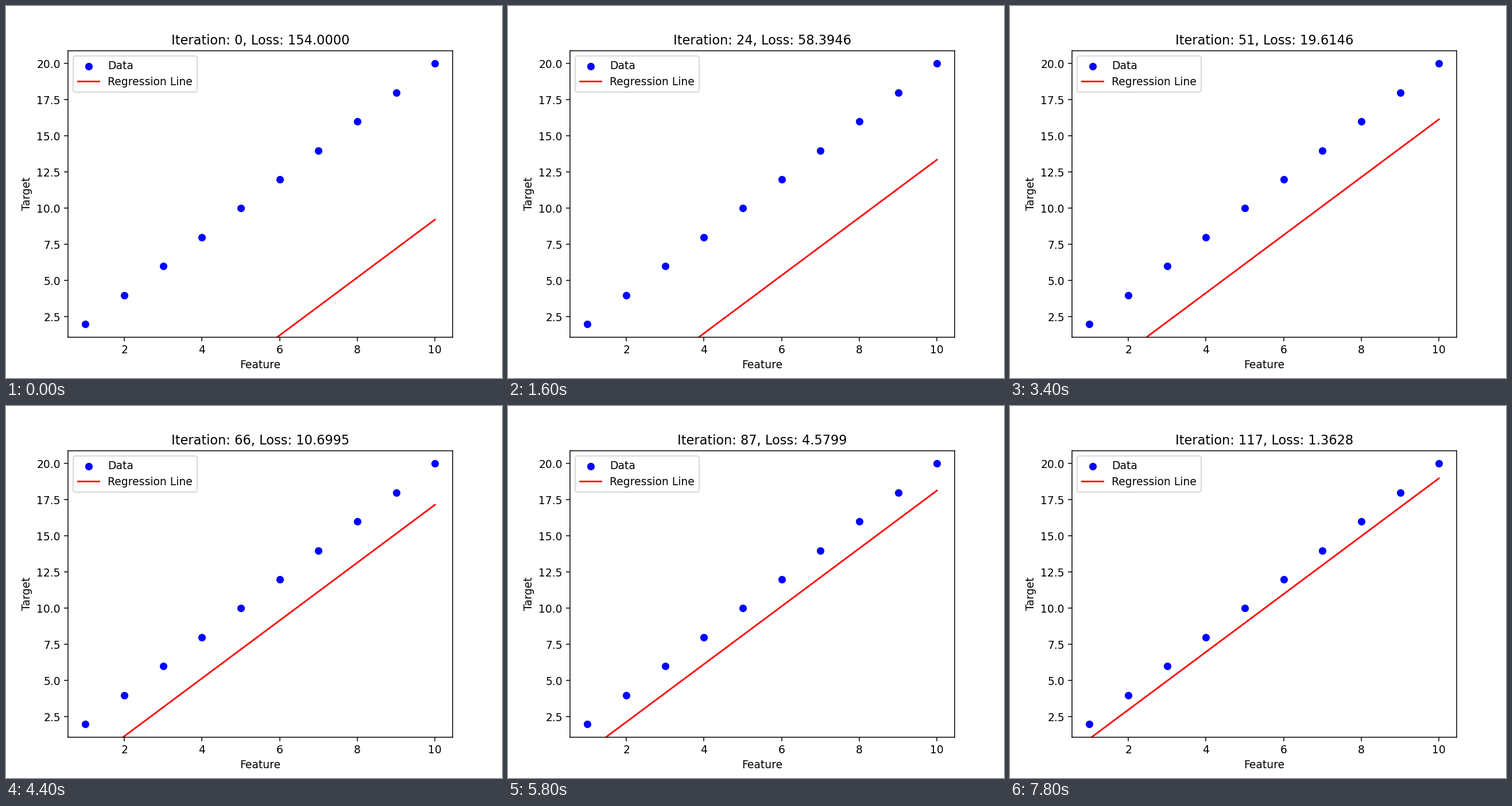
A matplotlib script for the animation above (8000 ms loop, 864 by 648 pixels).

```python
import numpy as np
import matplotlib.pyplot as plt
from matplotlib.animation import FuncAnimation

FRAMES = 40
INTERVAL = 200
STEPS_PER_FRAME = 3
RATE = 0.01

plt.rcParams["font.family"] = "DejaVu Sans"

x = np.arange(1, 11)
y = 2 * x
decay = 1 - 2 * RATE            # error factor of one gradient step
start_loss = np.mean(y ** 2)

fig, ax = plt.subplots(figsize=(6.4, 4.8), dpi=135)
ax.scatter(x, y, color="blue", label="Data")
line, = ax.plot([], [], color="red", label="Regression Line")
ax.set_xlim(0.55, 10.45)
ax.set_ylim(1.1, 20.9)
ax.set_xlabel("Feature")
ax.set_ylabel("Target")
ax.legend(loc="upper left")
title = ax.set_title("")


def update(frame):
    step = frame * STEPS_PER_FRAME
    loss = start_loss * decay ** (2 * step)
    # The line is drawn after the step, the loss is measured before it.
    gap = y.mean() * decay ** (step + 1)
    line.set_data(x, y - gap)
    title.set_text(f"Iteration: {step}, Loss: {loss:.4f}")
    return line, title


anim = FuncAnimation(fig, update, frames=FRAMES, interval=INTERVAL,
                     init_func=lambda: update(0), repeat=True,
                     repeat_delay=0, blit=False)
plt.show()
```
